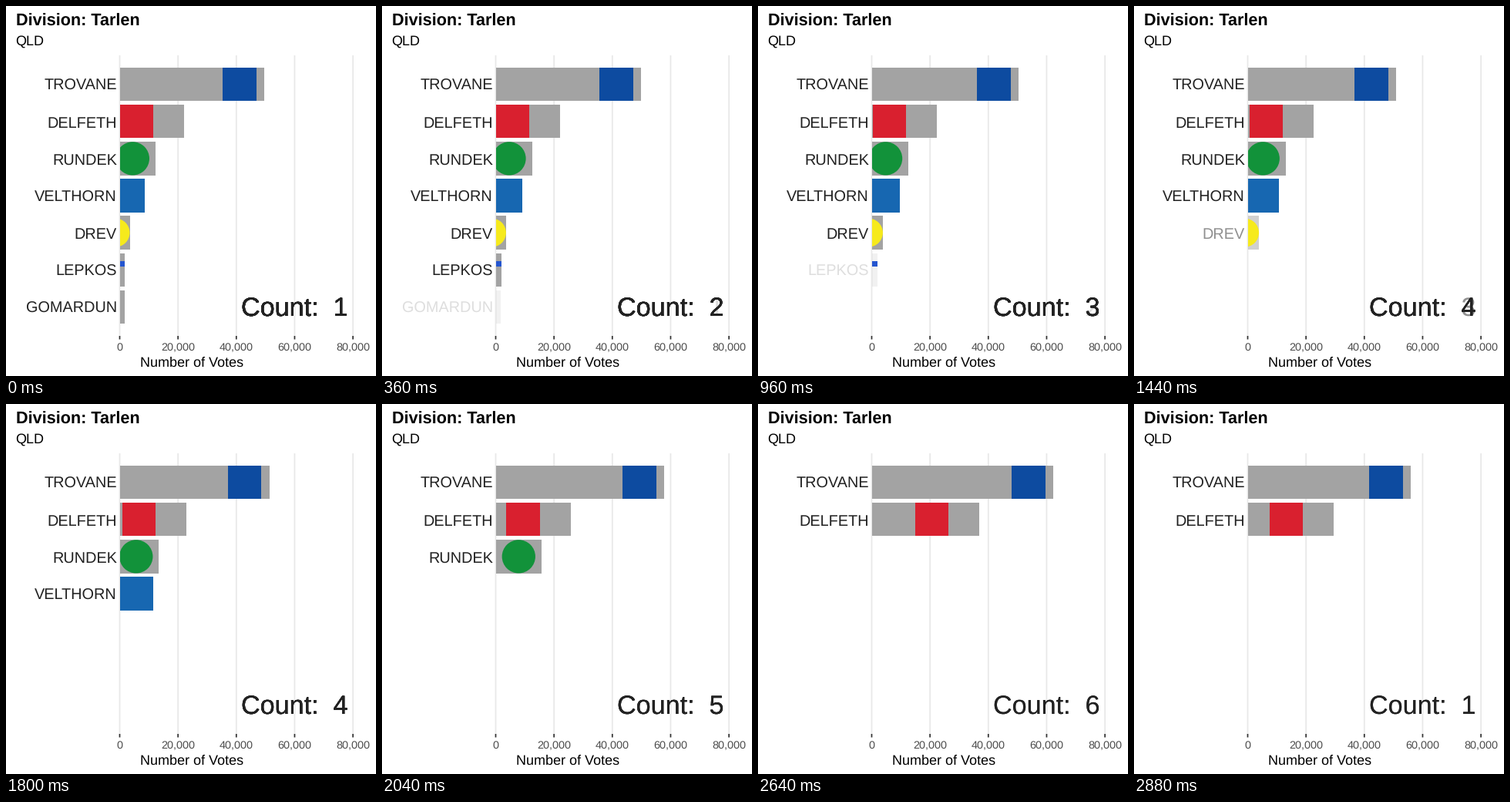
Write a matplotlib script that moves like this. It is 480x480 px and loops after 3 s.

```python
import matplotlib.pyplot as plt
from matplotlib.animation import FuncAnimation
from matplotlib.patches import Circle, Rectangle

SIZE = 480
DPI = 72
plt.rcParams["font.family"] = "Liberation Sans"
plt.rcParams["text.hinting"] = "none"

# Chart geometry in pixels, y pointing down
X0 = 147.5
PX_PER_VOTE = 75.65 / 20000
TOP, BOTTOM = 64, 428
BAR_TOP, BAR_STEP, BAR_H = 80, 48.12, 43.3

BAR_GREY = "#a3a3a3"
INK = "#222222"

NAMES = ["TROVANE", "DELFETH", "RUNDEK", "VELTHORN", "DREV", "LEPKOS", "GOMARDUN"]

# Votes per candidate after each count; the last candidate drops out each time
COUNTS = [
    [49570, 22070, 12300, 8720, 3440, 1720, 1590],
    [49880, 22230, 12500, 9170, 3570, 1900],
    [50430, 22420, 12650, 9850, 3860],
    [51290, 23000, 13480, 11500],
    [57770, 25780, 15730],
    [62260, 37010],
]

# Party badges: shape, colour, size, centre offset from bar end, vertical shift
BADGES = [
    ("square", "#0d4ba0", 43.3, -32, 0),
    ("square", "#d9202f", 43.3, -62, 0),
    ("circle", "#12923a", 43.3, -29.7, 0),
    ("square", "#1767b1", 43.3, -22, 0),
    ("circle", "#f6ea1c", 37, -18.5, 0),
    ("square", "#2455cf", 7, -3.5, -7.5),
    None,
]

# Still frames and in-between frames for each count
STILL = [2, 3, 3, 3, 3, 3]
MOVING = [2, 2, 1, 1, 1, 1]


def build_timeline():
    steps = []
    for state, (still, moving) in enumerate(zip(STILL, MOVING)):
        steps += [(state, 0.0)] * still
        steps += [(state, k / (moving + 1)) for k in range(1, moving + 1)]
    return steps


def ease(t):
    return 4 * t ** 3 if t < 0.5 else 1 - 4 * (1 - t) ** 3


def bar_y(i):
    return BAR_TOP + BAR_STEP * i


fig = plt.figure(figsize=(SIZE / DPI, SIZE / DPI), dpi=DPI, facecolor="white")
ax = fig.add_axes([0, 0, 1, 1])
ax.set_xlim(0, SIZE)
ax.set_ylim(SIZE, 0)
ax.axis("off")


def text(x, y, s, size, color="black", ha="left", **kw):
    return ax.text(x, y, s, fontsize=size, color=color, ha=ha, va="baseline", **kw)


def vline(x, y0, y1, color):
    ax.plot([x, x], [y0, y1], color=color, lw=1.75, snap=False,
            solid_capstyle="butt", zorder=0)


def draw_axes():
    for votes in range(0, 80001, 20000):
        x = X0 + votes * PX_PER_VOTE
        vline(x, TOP, BOTTOM, "#e8e8e8")
        vline(x, BOTTOM, BOTTOM + 4.5, "#333333")
        text(x, 447, f"{votes:,}", 14.4, "#4d4d4d", "center")
    text(13, 26, "Division: Tarlen", 21.6, weight="bold")
    text(12, 51, "QLD", 18)
    text(241, 468, "Number of Votes", 18, ha="center")


class Candidate:
    """One row: bar, badge, name and its own copy of the count text."""

    def __init__(self, i):
        self.i = i
        self.bar = ax.add_patch(
            Rectangle((X0, bar_y(i)), 0, BAR_H, fc=BAR_GREY, lw=0, zorder=1))
        self.name = text(144, round(bar_y(i) + 29.4), NAMES[i], 19.9, INK, "right")
        # Leavers fade beneath the copies of those who stay
        self.count = text(305, 403, "", 34.14, INK, zorder=20 - i)
        self.badge = self.make_badge(BADGES[i])

    def make_badge(self, spec):
        if spec is None:
            return None
        shape, color, size, self.dx, dy = spec
        self.size = size
        self.cy = bar_y(self.i) + BAR_H / 2 + dy
        if shape == "circle":
            patch = Circle((0, self.cy), size / 2)
        else:
            patch = Rectangle((0, self.cy - size / 2), size, size)
        patch.set(facecolor=color, linewidth=0, zorder=2)
        ax.add_patch(patch)
        panel = Rectangle((X0, TOP), SIZE - X0, BOTTOM - TOP, transform=ax.transData)
        patch.set_clip_path(panel)
        return patch

    def artists(self):
        found = [self.bar, self.name, self.count, self.badge]
        return [a for a in found if a is not None]

    def show(self, votes, alpha, number):
        for a in self.artists():
            a.set_visible(True)
        width = votes * PX_PER_VOTE
        self.bar.set_width(width)
        for a in (self.bar, self.name, self.count):
            a.set_alpha(alpha)
        self.count.set_text(f"Count:  {number}")
        if self.badge is None:
            return
        cx = X0 + width + self.dx
        if isinstance(self.badge, Circle):
            self.badge.set_center((cx, self.cy))
        else:
            self.badge.set_x(cx - self.size / 2)

    def hide(self):
        for a in self.artists():
            a.set_visible(False)


draw_axes()
rows = [Candidate(i) for i in range(len(NAMES))]
timeline = build_timeline()


def update(frame):
    state, t = timeline[frame]
    following = (state + 1) % len(COUNTS)
    now, then = COUNTS[state], COUNTS[following]
    e = ease(t)
    number = (following if t >= 0.5 else state) + 1
    for i, row in enumerate(rows):
        if i >= len(now):
            row.hide()
        elif i >= len(then):
            row.show(now[i], 1 - e, state + 1)
        else:
            row.show(now[i] + (then[i] - now[i]) * e, 1, number)
    return []


anim = FuncAnimation(fig, update, frames=len(timeline), interval=120,
                     repeat=True, repeat_delay=0, blit=False)
plt.show()
```
